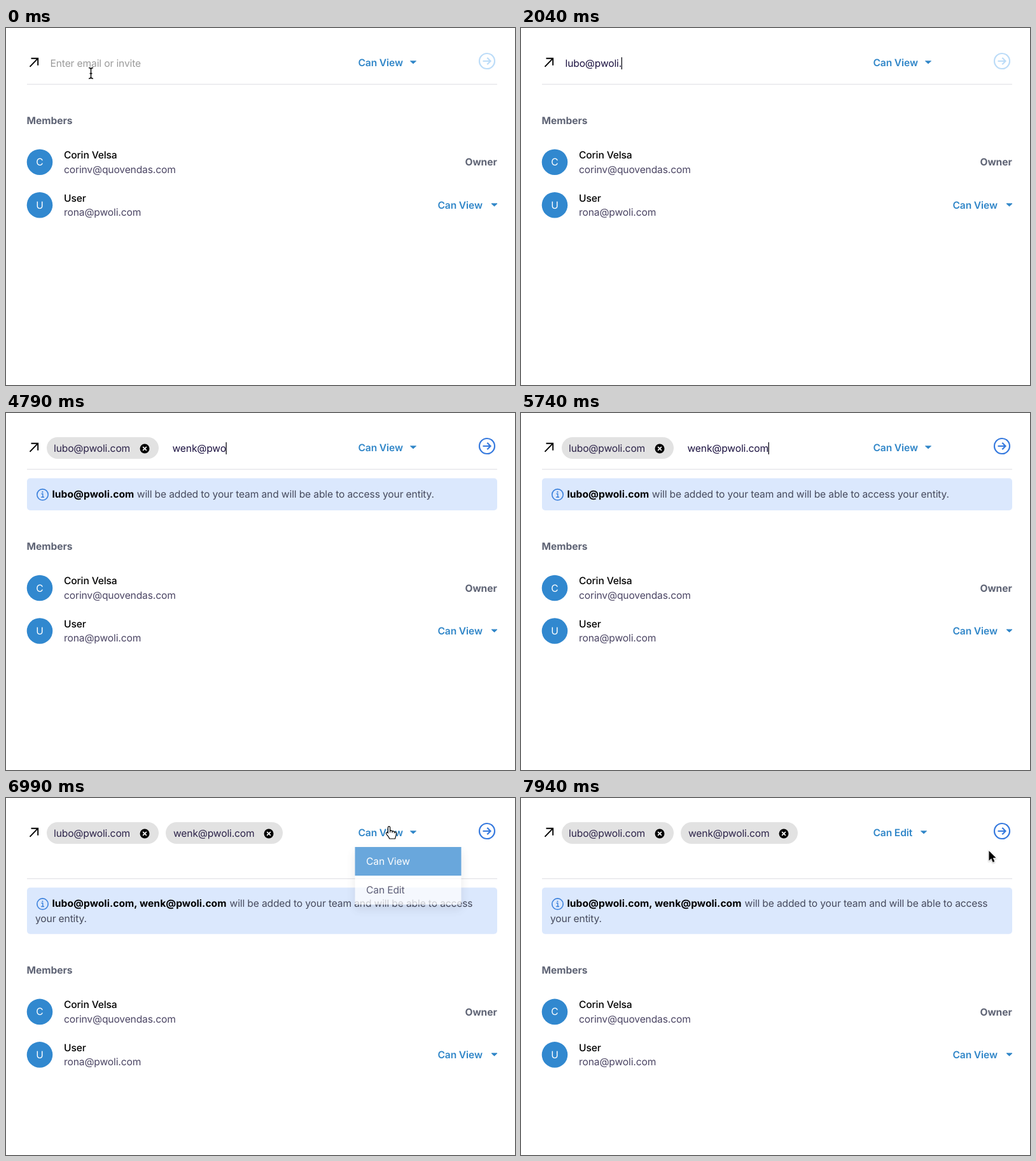
An HTML page for the animation above (7.99 s loop, 800x561 px).

```html
<!DOCTYPE html>
<html lang="en">
<head>
<meta charset="utf-8">
<title>Invite members</title>
<style>
  html, body { margin: 0; width: 100%; height: 100%; overflow: hidden; background: #fff; }
  svg { display: block; width: 800px; height: 561px; }
  text { font: 400 15.6px Inter, "Open Sans", sans-serif; letter-spacing: -.135px; text-rendering: geometricPrecision; fill: #4a4463; }
  .typed { fill: #1b1140; }
  .chip { fill: #2b2248; }
  .hint { fill: #9a9a9a; }
  .name { font-weight: 500; fill: #000; }
  .head { font-weight: 700; letter-spacing: -.05px; fill: #5f6475; }
  .pick { font-weight: 600; fill: #3086c8; }
  .bold { font-weight: 700; letter-spacing: .06px; fill: #000; }
  .note { fill: #45495c; }
  .option { fill: #2f2b45; }
  .mid { text-anchor: middle; fill: #fff; }
  .end { text-anchor: end; }
  #menu { filter: drop-shadow(0 7px 8px rgba(0, 0, 0, .12)); }
</style>
</head>
<body>
<svg viewBox="0 0 800 561">
  <defs>
    <path id="tri" d="M1 .6H10L5.5 4.7Z" fill="#3086c8" stroke="#3086c8" stroke-linejoin="round"/>
    <g id="close">
      <circle r="7.5"/>
      <path d="M-2.4-2.4 2.4 2.4M2.4-2.4-2.4 2.4" stroke="#fff" stroke-width="1.7" stroke-linecap="round"/>
    </g>
  </defs>

  <path d="M37.5 60.8 49.8 48.2M39.5 47.8H50.2V58.8" fill="none" stroke="#000" stroke-width="1.9"/>
  <text id="hint" class="hint" x="69.5" y="60.8">Enter email or invite</text>
  <g id="chip1">
    <rect x="64" y="38" width="176" height="34" rx="17" fill="#e2e2e2"/>
    <text class="chip" x="75" y="60.8">lubo@pwoli.com</text>
    <use href="#close" x="218" y="56"/>
  </g>
  <g id="chip2">
    <rect x="251" y="38" width="184" height="34" rx="17" fill="#e2e2e2"/>
    <text class="chip" x="263" y="60.8">wenk@pwoli.com</text>
    <use href="#close" x="413" y="56"/>
  </g>
  <text id="typed" class="typed" y="60.8"></text>
  <rect id="caret" y="46" width="1.4" height="19" fill="#1c1c24"/>

  <text id="pick" class="pick" x="553.5" y="59.8">Can View</text>
  <use id="pickTri" href="#tri" x="634.5" y="51.3"/>
  <g id="send" fill="none" stroke-width="2.2">
    <circle cx="756" cy="52" r="12"/>
    <path d="M749.5 52H761.5M756.3 46.8 761.5 52 756.3 57.2"/>
  </g>
  <rect id="rule" x="33" y="87.8" width="739" height="1.3" fill="#e4e4e8"/>

  <g id="banner">
    <rect id="panel" x="33" y="102.5" width="739" rx="5" fill="#dbe8fd"/>
    <circle cx="57.5" cy="128.3" r="8.7" fill="none" stroke="#3a80dc" stroke-width="1.6"/>
    <path d="M55.5 127H57.8V132M55.2 132.2H60" fill="none" stroke="#3a80dc" stroke-width="1.4"/>
    <circle cx="57.4" cy="124.2" r="1.1" fill="#3a80dc"/>
    <text id="who" class="bold" x="72.5" y="133.2"></text>
    <text id="what" class="note" y="133.2"></text>
    <text id="more" class="note" x="46" y="156.6">your entity.</text>
  </g>

  <g id="list">
    <text class="head" x="32.5" y="151">Members</text>
    <circle cx="53" cy="210.7" r="20.3" fill="#3188cf"/>
    <text class="mid" x="53" y="216.3">C</text>
    <text class="name" x="91" y="205">Corin Velsa</text>
    <text x="91" y="227.6">corinv@quovendas.com</text>
    <text class="head end" x="771.8" y="216.4">Owner</text>
    <circle cx="53" cy="278.2" r="20.3" fill="#3188cf"/>
    <text class="mid" x="53" y="283.8">U</text>
    <text class="name" x="91" y="272.6">User</text>
    <text x="91" y="295.1">rona@pwoli.com</text>
    <text class="pick" x="678.5" y="284">Can View</text>
    <use href="#tri" x="762" y="275.3"/>
  </g>

  <g id="menu">
    <rect x="548.5" y="77" width="167" height="90.5" rx="2" fill="#fff"/>
    <rect id="glow" x="548.5" width="167" height="45" fill="#3186cf"/>
    <text id="optView" class="option" x="566" y="104.8">Can View</text>
    <text id="optEdit" class="option" x="566" y="149.8">Can Edit</text>
  </g>

  <path id="beam" d="M130 62.5Q133.5 62.5 133.5 65V77Q133.5 79.5 130 79.5M137 62.5Q133.5 62.5 133.5 65V77Q133.5 79.5 137 79.5M131.5 71.5H135.5" fill="none" stroke="#000" stroke-width="1.4"/>
  <g id="arrow">
    <path d="M0 0V15.4L3.6 12 6.2 17.9 8.8 16.8 6.3 11H11Z" fill="#000" stroke="#fff" stroke-width="1.6" paint-order="stroke" style="filter:drop-shadow(0 1px 1px rgba(0,0,0,.3))"/>
  </g>
  <g id="hand">
    <path d="M-1.6 1.2C-1.6-.8 1.6-.8 1.6 1.2V7C2.2 5.6 5 5.8 5 7.6 6 6.6 8.3 7 8.3 8.6 9.6 8 11.4 8.6 11.4 10.4 11.6 14 10 15.6 9.6 19H.6C0 16-2.6 14.4-4.4 11.2-5.2 9.4-3 8.4-1.6 10.2Z" fill="#fff" stroke="#000" stroke-width="1.2" stroke-linejoin="round"/>
    <path d="M1.6 6.5V9.5M5 7.8V10M8.3 8.8V10.5" stroke="#000"/>
  </g>
</svg>

<script>
const LOOP = 7990, FIRST = 2610, SECOND = 5940, CHOSEN = 7590;
const $ = id => document.getElementById(id);
const show = (id, on) => { $(id).style.display = on ? '' : 'none'; };
const shift = (id, x, y) => $(id).setAttribute('transform', `translate(${x} ${y})`);
const clamp = v => Math.max(0, Math.min(1, v));

// each word's letters appear at these times
const words = [
  { text: 'lubo@pwoli.com', x: 69.5, from: 40, to: FIRST,
    at: [40, 290, 490, 640, 740, 1390, 1490, 1640, 1740, 1840, 2040, 2140, 2290, 2390] },
  { text: 'wenk@pwoli.com', x: 261.5, from: FIRST, to: SECOND,
    at: [3190, 3340, 3610, 3740, 3990, 4390, 4640, 4790, 4940, 5140, 5290, 5390, 5540, 5640] }
];

// pointer path: time, x, y, shape
const path = [
  [6290, 133, 71, 'arrow'], [6390, 250, 74, 'arrow'], [6540, 480.5, 69.5, 'arrow'],
  [6640, 548, 62, 'arrow'], [6740, 590, 50, 'hand'], [6840, 602, 45, 'hand'],
  [7240, 602, 45, 'hand'], [7440, 598, 140, 'hand'], [7640, 598, 140, 'hand'],
  [7690, 612, 137, 'arrow'], [7940, 735.5, 83, 'arrow']
];

function pointer(t) {
  const i = path.findLastIndex(k => k[0] <= t);
  if (i < 0) return null;
  const a = path[i], b = path[i + 1] || a;
  const p = b === a ? 0 : (t - a[0]) / (b[0] - a[0]);
  return { x: a[1] + (b[1] - a[1]) * p, y: a[2] + (b[2] - a[2]) * p, shape: a[3] };
}

function drawInput(t) {
  const w = words.find(w => t >= w.from && t < w.to);
  const text = w ? w.text.slice(0, w.at.filter(s => s <= t).length) : '';
  const el = $('typed');
  el.textContent = text;
  show('caret', w && !(t >= 2990 && t < 3190));
  if (w) {
    el.setAttribute('x', w.x);
    $('caret').setAttribute('x', w.x + (text ? el.getComputedTextLength() - .5 : -.2));
  }
}

function drawLayout(t) {
  const one = t >= FIRST, two = t >= SECOND, drop = two ? 38.3 : 0;
  show('hint', t < 40);
  show('beam', t < 40);
  show('chip1', one);
  show('chip2', two);
  show('banner', one);
  show('more', two);
  $('send').setAttribute('stroke', one ? '#3579de' : '#bcdcf8');
  shift('rule', 0, drop);
  shift('banner', 0, drop);
  shift('list', 0, two ? 125.2 : one ? 64.3 : 0);
  $('panel').setAttribute('height', two ? 73 : 50.5);
  $('who').textContent = words.slice(0, two ? 2 : 1).map(w => w.text).join(', ');
  $('what').setAttribute('x', two ? 351.5 : 205.8);
  $('what').textContent = 'will be added to your team and will be able to access' + (two ? '' : ' your entity.');
}

function drawMenu(t, at) {
  const fade = clamp((t - 6845) / 200) * clamp((CHOSEN + 150 - t) / 150);
  const done = t >= CHOSEN;
  const edit = done || (at && at.y > 112 && t > 7240);
  show('menu', fade > 0);
  $('menu').style.opacity = fade;
  $('glow').setAttribute('y', edit ? 122 : 77);
  $('optView').style.fill = edit ? '' : '#fff';
  $('optEdit').style.fill = edit ? '#fff' : '';
  $('pick').textContent = done ? 'Can Edit' : 'Can View';
  $('pickTri').setAttribute('x', done ? 627.5 : 634.5);
}

function draw(t) {
  const step = Math.floor((t - 40) / 50) * 50 + 40;
  const at = pointer(step);
  drawInput(t);
  drawLayout(t);
  drawMenu(step, at);
  for (const shape of ['arrow', 'hand']) {
    const on = at && at.shape === shape;
    show(shape, on);
    if (on) shift(shape, at.x, at.y);
  }
}

const start = performance.now();
function tick() {
  draw((performance.now() - start) % LOOP);
  requestAnimationFrame(tick);
}
tick();
</script>
</body>
</html>
```
